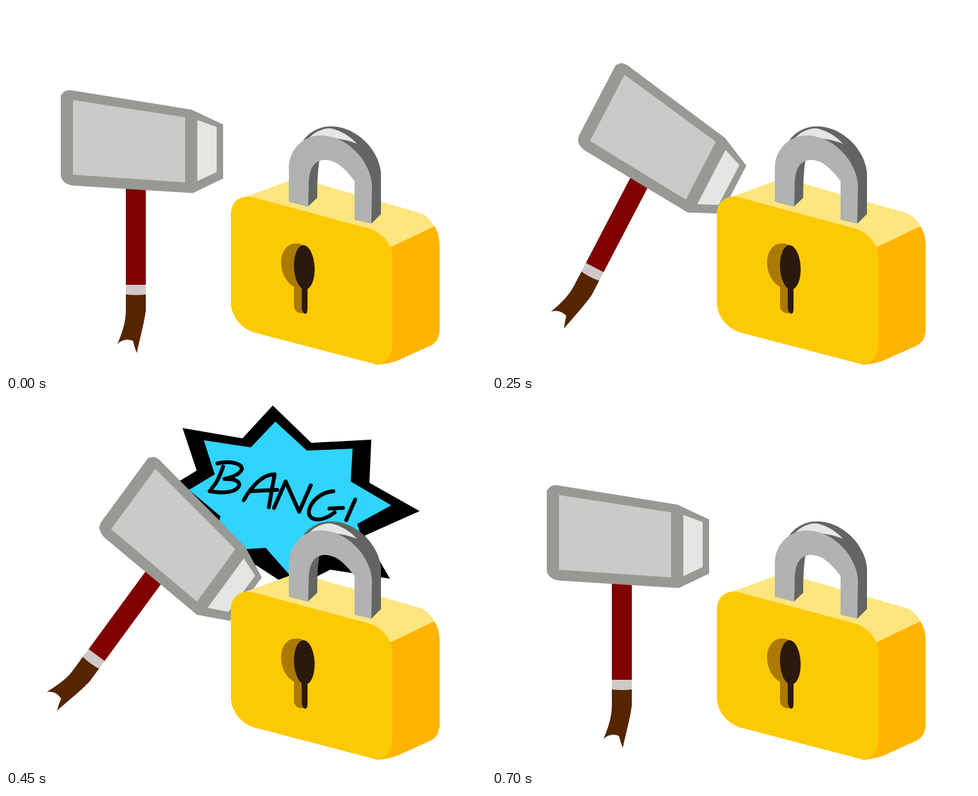
Animation of 745 by 570 pixels, one loop 0.75 s. Source, as an HTML page:

```html
<!DOCTYPE html>
<html lang="en">
<head>
<meta charset="utf-8">
<title>Hammer and padlock</title>
<style>
  html, body { margin: 0; width: 100%; height: 100%; overflow: hidden; background: #fff; }
  svg { display: block; }
</style>
</head>
<body>
<svg width="745" height="570" viewBox="0 0 745 570">
  <g id="bang">
    <path d="M414 7 474 65 567 60 564 127 642 171 557 209 596 276 503 262 445 292 388 255 300 255 318 190 255 133 296 108 274 42 367 58Z"/>
    <path id="burst" d="M418 32 467 77 538 74 535 125 598 162 545 191 562 240 482 230 440 270 403 228 318 234 333 179 284 138 324 114 307 61 380 72Z"/>
    <g fill="none" stroke="#000" stroke-width="6" stroke-linecap="round" stroke-linejoin="round">
      <path d="M337 102Q329 126 319 136M328 97C350 92 367 98 366 106Q362 116 339 121Q363 121 362 131C358 142 338 144 316 140"/>
      <path d="M369 154C382 131 400 113 417 114Q412 140 408 165M380 140 421 138"/>
      <path d="M416 166 434 125 455 172 473 131"/>
      <path d="M508 140C488 142 473 156 470 171C469 188 492 188 510 173M502 167 523 166"/>
      <path d="M542 153 528 185"/>
    </g>
  </g>

  <g id="hammer">
    <path fill="#800000" d="M186 280H217V434H186Z"/>
    <path fill="#552500" d="M186 446H217V473C214 495 208 515 203 539Q199 529 197 520Q183 515 173 525C181 506 186 490 186 473Z"/>
    <path fill="#cfc8c7" d="M186 433H217V448Q202 450 186 448Z"/>
    <path fill="#979995" d="M85 139 90 133Q95 130 102 131L288 161 337 184V268L290 290.500 106 279Q86 277 85 262Z"/>
    <path fill="#c9cbc8" d="M104 146 278 173V274L104 262Z"/>
    <path fill="#e4e6e3" d="M297 177 327 188V258L297 272Z"/>
  </g>

  <g id="lock">
    <path fill="#ffb400" d="M590 375 665 342Q673 354 673 372V504Q672 522 658 528L607 551Q590 557 573 557Z"/>
    <path fill="#fde57f" d="M370 297 452 267 645 322Q657 328 665 342L590 378 480 340Z"/>
    <path fill="#fcca03" d="M349 325C349 306 360 296 376 296Q382 297 387 298L565 346C580 351 597 365 600 388V520C600 541 592 557 572 556L385 507C363 500 349 480 349 460Z"/>
    <path fill="#636562" d="M461 209C472 194 488 187 504 187C545 187 580 225 582 260V323L567 338 555 255 490 203Z"/>
    <path fill="#636562" d="M468 312 483 298Q483 255 487 238L468 250Z"/>
    <path fill="#e4e6e3" d="M468 207Q484 190 503 190Q526 194 545 214Q522 205 490 204Z"/>
    <path fill="#b0b3b0" d="M439 304V250C440 222 462 201 488 201C527 201 564 237 568 277L567 338 541 332V272Q517 239 496 239C478 239 471 253 470 272L469 312Z"/>
    <path fill="#aa7a04" d="M464 373Q456 368 449 369C436 369 427 382 427 398C427 416 436 430 447 436V468Q450 479 464 477Z"/>
    <ellipse fill="#2b190e" cx="463" cy="406" rx="16" ry="34.500" transform="rotate(-3 463 406)"/>
    <path fill="#2b190e" d="M459 434V470Q461 478 465 478Q468 477 468 470V434Z"/>
  </g>
</svg>
<script>
const STEP = 50, LOOP = 750;
const PIVOT = [167, 258];
// step, shift x, shift y, degrees
const keys = [
  [0, 0, 0, 0],
  [4, 36.2, -20.7, 18.8],
  [6, 49.3, -25, 36.25],
  [9, 49.3, -25, 36.25],
  [10, 36.1, -18.6, 26.4],
  [11, 21.5, -10.9, 15.8],
  [12, 13.8, -6.6, 10.1],
  [14, 0, 0, 0]
];
const colors = ['#30d4ff', '#ffe92f', '#ff2380'];
const BANG_START = 6, BANG_END = 9;
const $ = id => document.getElementById(id);

function pose(step) {
  const next = Math.max(1, keys.findIndex(k => k[0] >= step));
  const a = keys[next - 1], b = keys[next];
  const p = (step - a[0]) / (b[0] - a[0]);
  return a.map((v, i) => v + (b[i] - v) * p);
}

function draw() {
  const step = Math.floor(performance.now() % LOOP / STEP);
  const [, x, y, angle] = pose(step);
  $('hammer').setAttribute('transform', `translate(${x} ${y}) rotate(${angle} ${PIVOT})`);

  const visible = step >= BANG_START && step <= BANG_END;
  $('bang').setAttribute('visibility', visible ? 'visible' : 'hidden');
  if (visible) $('burst').setAttribute('fill', colors[(step - BANG_START) % colors.length]);
  requestAnimationFrame(draw);
}
draw();
</script>
</body>
</html>
```
